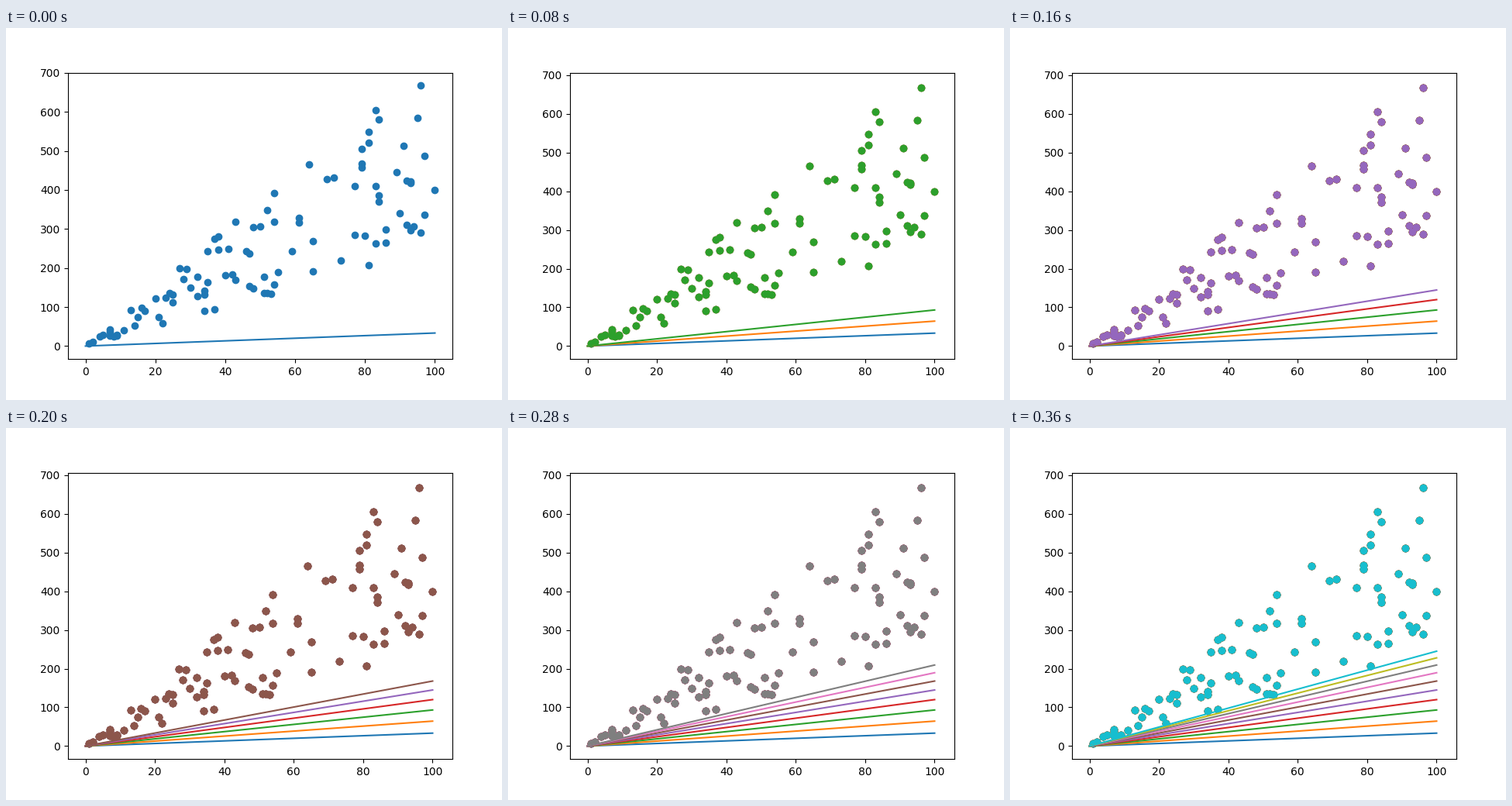
Animation, 640 px wide and 480 px high, one loop 440 ms. Source, as a matplotlib script:

```python
import matplotlib.pyplot as plt
from matplotlib.animation import FuncAnimation

STEPS = 10
HOLD = 1          # extra ticks on the finished plot
INTERVAL = 40     # ms
MARKER_PAD = 3    # px kept free beyond the outermost marker
PEAK_X, PEAK_Y = 100, 667

XS = [1, 2, 4, 5, 7, 7, 7, 8, 9, 9, 11, 13, 14, 15, 16, 17, 20, 21, 22, 23,
      24, 25, 25, 27, 28, 29, 30, 32, 32, 34, 34, 34, 35, 35, 37, 37, 38, 38,
      40, 41, 42, 43, 43, 46, 47, 47, 48, 48, 50, 51, 51, 52, 52, 53,
      54, 54, 54, 55, 59, 61, 61, 64, 65, 65, 69, 71, 73, 77, 77,
      79, 79, 79, 80, 81, 81, 81, 83, 83, 83, 84, 84, 84, 86, 86,
      89, 90, 91, 92, 92, 93, 93, 93, 94, 95, 96, 96, 97, 97, 100]
YS = [6.5, 10, 24, 28, 42, 37, 26, 25, 28, 26, 40, 93, 52, 74, 97.943, 91,
      121, 75, 58, 123,
      136, 132, 111, 199, 171, 197, 149, 177, 127, 141, 132, 91, 243, 163,
      275, 94, 281, 247,
      181, 249, 184, 318.5, 169, 242, 237, 154, 304.5, 147, 307, 177, 135,
      348.5, 135, 134,
      391, 318, 157, 189, 243, 329, 316.5, 465, 269, 192, 427, 431, 219,
      410, 285,
      506, 467, 457, 283, 548, 520, 207, 605, 409, 263, 580, 386.365, 371,
      298.235, 265,
      445, 340, 512.5, 423, 310.5, 421.5, 418, 296, 306.5, 584, PEAK_Y, 290,
      487, 336.5, 400.385]

# Gradient descent: the slope closes a fixed share of its gap every step.
BEST_SLOPE = 4.704
RATE = 0.071


def slope(step):
    return BEST_SLOPE * (1 - (1 - RATE) ** (step + 1))


def limits(step, peak, pixels):
    """Axis range with 5% margins, refitted to the markers at each step."""
    top = peak
    for _ in range(step):
        top = peak + MARKER_PAD * 1.1 * top / pixels
    return -0.05 * top, 1.05 * top


fig, ax = plt.subplots(figsize=(6.4, 4.8), dpi=100)
width = 640 * ax.get_position().width
height = 480 * ax.get_position().height

layers = []
for i in range(STEPS):
    dots = ax.scatter(XS, YS, color=f"C{i}")
    line, = ax.plot([0, PEAK_X], [0, PEAK_X * slope(i)], color=f"C{i}")
    layers.append((dots, line))


def update(frame):
    step = min(frame, STEPS - 1)
    for i, layer in enumerate(layers):
        for artist in layer:
            artist.set_visible(i <= step)
    ax.set_xlim(*limits(step, PEAK_X, width))
    ax.set_ylim(*limits(step, PEAK_Y, height))
    return []


anim = FuncAnimation(fig, update, frames=STEPS + HOLD, interval=INTERVAL,
                     init_func=lambda: update(0), repeat=True, repeat_delay=0)
plt.show()
```
